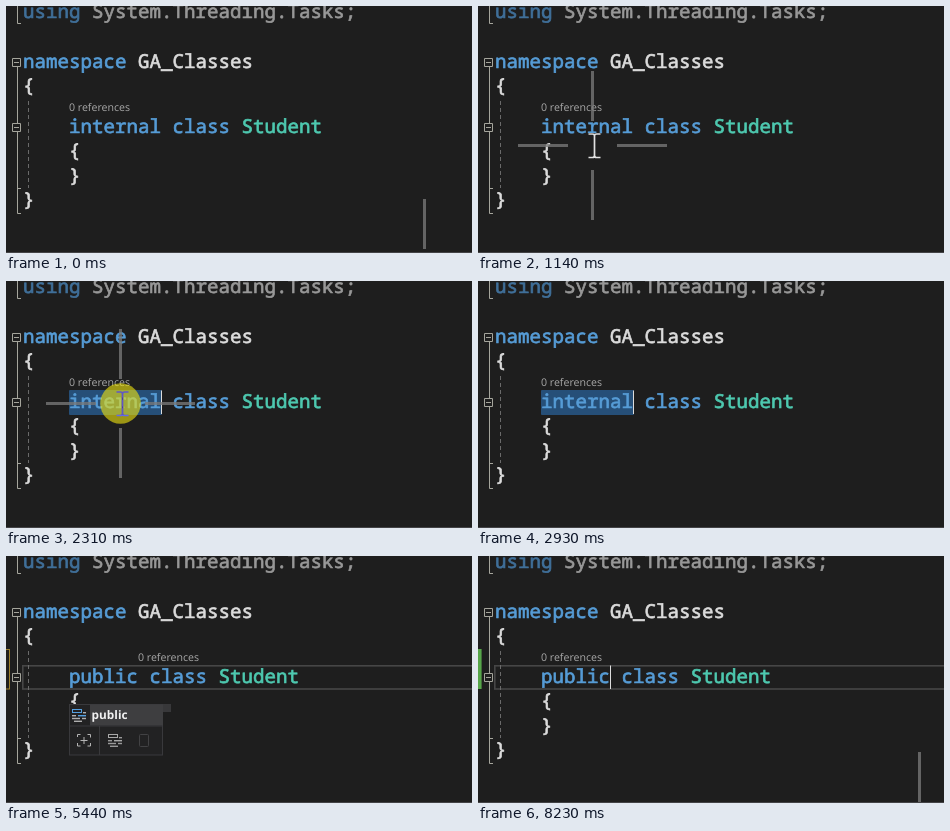
Recreate the animation shown at these times as an HTML page. Size 466 px wide and 247 px high, loop 8.38 s.

```html
<!DOCTYPE html>
<html lang="en">
<head>
<meta charset="utf-8">
<title>Changing an access modifier</title>
<style>
  html, body { margin: 0; width: 100%; height: 100%; overflow: hidden; background: #1e1e1e; }
  svg { display: block; width: 466px; height: 247px; }
  text { white-space: pre; text-rendering: geometricPrecision; }
  .code {
    font: 19.17px "Noto Sans Mono", "DejaVu Sans Mono", monospace;
    color: #dcdcdc; fill: currentColor; stroke: currentColor; stroke-width: .7;
  }
  .code.kw { color: #569cd6; }
  .code.type { color: #4ec9b0; }
  .code.dimkw { color: #40709a; }
  .code.dim { color: #989898; }
  .lens { font: 10.6px "Open Sans", "Noto Sans", sans-serif; fill: #a8a8a8; }
  .item { font: 11.8px "Open Sans", "Noto Sans", sans-serif; fill: #f1f1f1; }
  .bold { font-weight: 700; }
  .outline { fill: none; stroke: #a5a59c; }
  .guide { stroke: #6a6a6a; stroke-dasharray: 4 3; }
  #beam { mix-blend-mode: difference; }
</style>
</head>
<body>
<svg viewBox="0 0 466 247">
  <rect width="466" height="247" fill="#1e1e1e"/>
  <rect y="246" width="466" height="1" fill="#434346"/>
  <rect id="line" x="16.8" y="109.8" width="460" height="23.2" fill="none" stroke="#464646" stroke-width="1.6"/>
  <rect id="sel" x="63" y="109" width="93" height="25" rx="1" fill="#264f78"/>

  <rect id="dirty" x="-2" y="93.5" width="5.5" height="39.5" fill="none" stroke="#9c7f2c"/>
  <rect id="saved" y="93" width="3.6" height="40" fill="#57a64a"/>

  <path class="outline" d="M11.5 0V17.5H15M11.5 61V117M11.5 126V207.5H15M11.5 182.5H15"/>
  <path class="outline" d="M6.5 52.5h8v8h-8zM8 56.5h5M6.5 117.5h8v8h-8zM8 121.5h5"/>
  <path class="guide" d="M22.5 95V182"/>
  <path id="guide" class="guide" d="M0 93V149"/>

  <g id="code"></g>
  <path id="squiggle" fill="none" stroke="#a09468"/>
  <text id="lens" class="lens" y="105">0 references</text>
  <rect id="caret" y="109.5" width="1" height="23.5" fill="#dcdcdc"/>

  <g id="popup">
    <rect id="tall" x="64" y="148" width="93" height="110" fill="#252526" stroke="#3a3a3d"/>
    <rect x="63.5" y="148.5" width="93" height="50.5" fill="#222223" stroke="#39393c"/>
    <rect x="84" y="148.5" width="73" height="21" fill="#3e3e40"/>
    <path d="M64 170H157M93.5 170V199" stroke="#39393c"/>
    <text class="item" x="85.6" y="163"><tspan id="hit" class="bold"></tspan><tspan id="rest"></tspan></text>
    <g id="icons"></g>
    <path d="M71.5 181v-2.5h3M81.5 178.5h3v3M84.5 187v3h-3M74.5 190h-3v-3M78 181v7M74.5 184.5h7" fill="none" stroke="#b4b4b4"/>
    <rect x="133.5" y="178.5" width="9" height="12" rx="1" fill="none" stroke="#424244"/>
  </g>
  <rect id="tip" x="157" y="148" height="8" fill="#38383a"/>

  <g id="pointer">
    <circle id="spot" r="20.3" fill="#f0e410" opacity=".8"/>
    <path d="M-74.5 0H-24.5M24.5 0H74.5M0 -74.5V-24.5M0 24.5V74.5" stroke="#7a7a7a" stroke-width="3" opacity=".76"/>
  </g>
  <path id="beam" d="M-6 -11.5H-2Q0 -11.5 0 -9.5V10Q0 12 -2 12H-6M6 -11.5H2Q0 -11.5 0 -9.5M0 10Q0 12 2 12H6" fill="none" stroke="#fff" stroke-width="1.7"/>
</svg>
<script>
const LOOP = 8380, CELL = 11.5, STEP = 76;
const $ = id => document.getElementById(id);
const col = n => 17 + n * CELL;
const NS = "http://www.w3.org/2000/svg";

function add(parent, tag, attrs, text) {
  const el = document.createElementNS(NS, tag);
  for (const k in attrs) el.setAttribute(k, attrs[k]);
  if (text) el.textContent = text;
  return parent.appendChild(el);
}
const token = (c, y, text, kind = "") =>
  add($("code"), "text", { class: "code " + kind, x: col(c), y }, text);

token(0, 12, "using", "dimkw");
token(6, 12, "System.Threading.Tasks;", "dim");
token(0, 62, "namespace", "kw");
token(10, 62, "GA_Classes");
token(0, 86, "{");
token(4, 151, "{");
token(4, 176, "}");
token(0, 200, "}");
const word = token(4, 127, "internal", "kw");
const cls = token(13, 127, "class", "kw");
const type = token(19, 127, "Student", "type");

function keywordIcon(x, y, accent, ink) {
  const bar = (dx, dy, w, fill) =>
    add($("icons"), "rect", { x: x + dx, y: y + dy, width: w, height: 1.4, fill });
  add($("icons"), "rect", { x: x + .5, y: y + .5, width: 9, height: 3, fill: "none", stroke: accent });
  bar(11, 3, 3, ink);
  bar(0, 6, 4, ink); bar(6, 6, 8, accent);
  bar(0, 8.8, 8, ink); bar(10, 8.8, 4, ink);
  bar(2, 11.6, 8, ink);
}
keywordIcon(66, 153, "#55a0e0", "#b0b0b0");
keywordIcon(102, 178, "#a8a8a8", "#9a9a9a");

const keys = [3410, 3640, 4040, 4340, 4650, 4880];
const clamp = v => Math.min(1, Math.max(0, v));
const part = (t, a, b) => clamp((t - a) / (b - a));
const within = (t, a, b) => t >= a && t < b;
const show = (id, on) => $(id).setAttribute("visibility", on ? "visible" : "hidden");
const set = (id, k, v) => $(id).setAttribute(k, v);

function curve(p, a, b, c) {
  const q = 1 - p;
  return [0, 1].map(i => q * q * a[i] + 2 * q * p * b[i] + p * p * c[i]);
}
const stepped = (t, a) => t < a ? a : a + Math.floor((t - a) / STEP) * STEP;

function pointerAt(t) {
  if (t < 1250) {
    const p = part(stepped(t, 374), 374, 1210);
    return curve(1 - (1 - p) ** 2.6, [418, 267], [230, 262], [114, 139]);
  }
  if (t < 4000) {
    const p = part(stepped(t, 1214), 1214, 1670);
    return [114, 139 - 17 * p * p * (3 - 2 * p)];
  }
  const p = part(stepped(t, 7166), 7166, 8230);
  return curve(p * p * (3 - 2 * p), [150, 178], [300, 250], [441, 270]);
}

function caretOn(t) {
  return within(t, 1760, 1920) || within(t, 2000, 2400) || within(t, 2930, 5350) ||
    within(t, 5900, 6460) || within(t, 6990, 7520) || t >= 8000;
}

function render(t) {
  const typed = keys.filter(k => t >= k).length;
  const len = typed || 8;
  const end = col(4 + len);

  word.textContent = typed ? "public".slice(0, typed) : "internal";
  word.setAttribute("class", typed && typed < 6 ? "code" : "code kw");
  cls.setAttribute("x", col(5 + len));
  type.setAttribute("x", col(11 + len));

  show("line", within(t, 1760, 1920) || typed);
  show("sel", within(t, 1920, 3410));
  show("dirty", within(t, 3410, 5820));
  show("saved", t >= 5820);
  show("guide", within(t, 3410, 5050));
  set("guide", "transform", `translate(${end + 5} 0)`);
  show("squiggle", within(t, 3710, 4880));
  set("squiggle", "d", "M63 133.5" + "l2 -2l2 2".repeat(Math.round(typed * CELL / 4)));

  show("lens", !within(t, 6380, 7240));
  set("lens", "x", within(t, 3410, 6380) ? end : 63);
  show("caret", caretOn(t));
  set("caret", "x", t < 1920 ? 116 : Math.floor(end));

  const open = within(t, 3640, 5820);
  show("popup", open);
  show("tall", within(t, 3640, 3710));
  set("popup", "opacity", t < 5510 ? 1 : t < 5590 ? 0.6 : 0.25);
  $("hit").textContent = "public".slice(0, typed);
  $("rest").textContent = "public".slice(typed);
  show("tip", within(t, 5350, 5590));
  set("tip", "width", t < 5510 ? 8 : 87);
  set("tip", "opacity", t < 5510 ? 1 : 0.5);

  // Half pixels keep the three-pixel arms sharp
  const [x, y] = pointerAt(t).map(v => Math.round(v) + 0.5);
  const fade = t < 4000 ? 1 - part(t, 2470, 2710) : +(t >= 7160);
  set("pointer", "transform", `translate(${x} ${y})`);
  set("pointer", "opacity", fade);
  set("beam", "transform", `translate(${x + 2} ${y})`);
  set("beam", "opacity", fade);
  const spot = t < 1000 ? 1 - part(t, 450, 600)
    : within(t, 1690, 4000) ? 1 - part(t, 2230, 2560) : 0;
  set("spot", "opacity", 0.8 * spot);
}

// The opening picture holds until the pointer starts to move
const hold = t => t < 450 ? 0 : t;
const start = performance.now();
function tick() {
  render(hold((performance.now() - start) % LOOP));
  requestAnimationFrame(tick);
}
tick();
</script>
</body>
</html>
```
